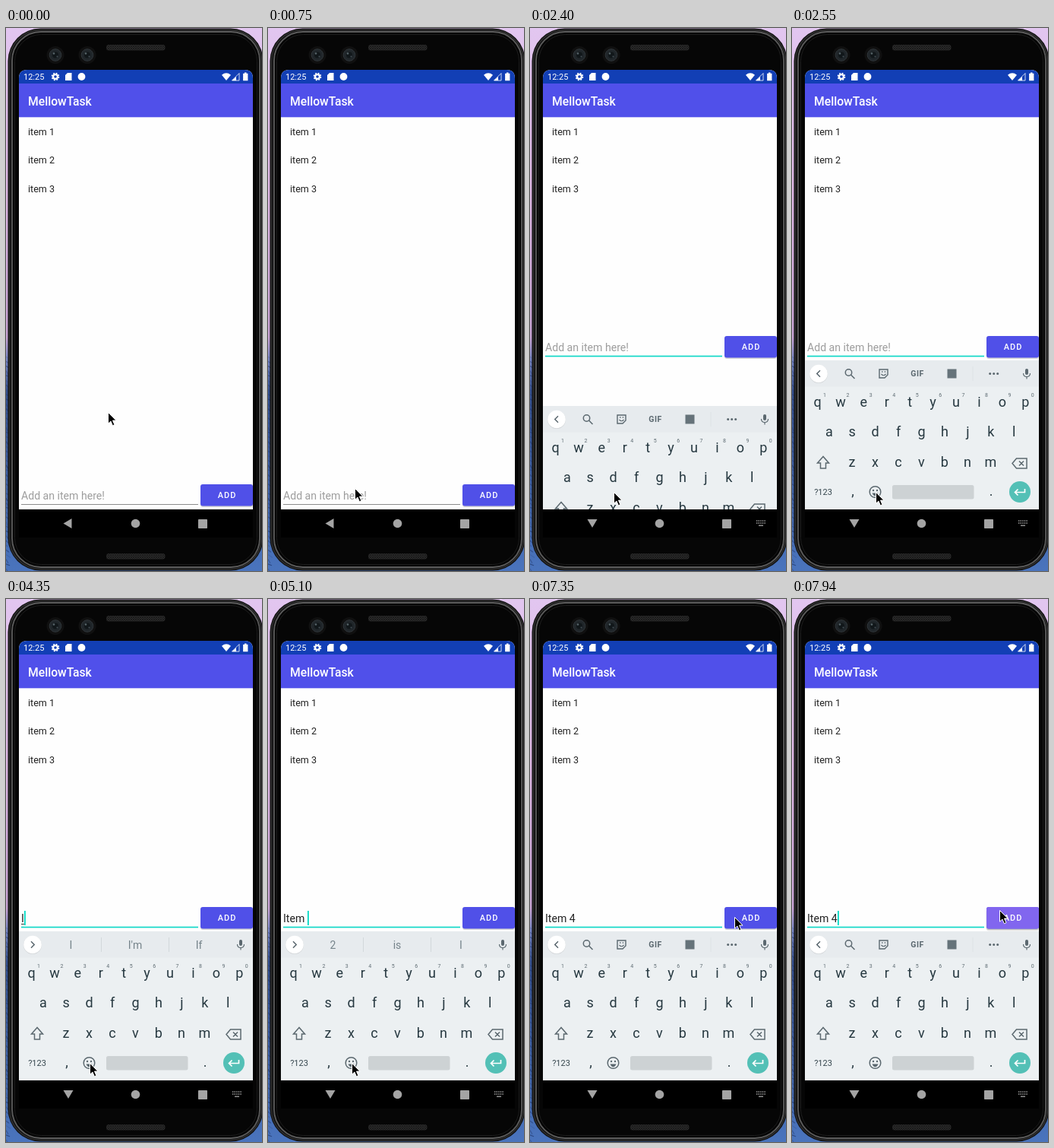
An HTML page that plays this animation: 337 by 714 pixels, repeating every 8 s.

```html
<!DOCTYPE html>
<html lang="en">
<head>
<meta charset="utf-8">
<title>List app demo</title>
<style>
  html, body { margin: 0; width: 100%; height: 100%; overflow: hidden; background: #000; }
  svg { display: block; width: 100vw; height: 100vh; }
  text { font-family: Roboto, "Noto Sans", sans-serif; white-space: pre; }
  .mid text, text.mid { text-anchor: middle; }
  .item { font-size: 12.55px; fill: #222; }
  .key { font-size: 18px; fill: #263840; }
  .hint { font-size: 7px; fill: #5f6c73; }
  .word { font-size: 14px; fill: #75838a; }
  .line { fill: none; stroke: #5b686f; stroke-width: 1.5; }
</style>
</head>
<body>
<svg viewBox="0 0 337 714" preserveAspectRatio="none">
  <defs>
    <linearGradient id="sky" x1="0" y1="0" x2="0" y2="1">
      <stop offset="0" stop-color="#e2c6f0"/>
      <stop offset=".3" stop-color="#dcb6e2"/>
      <stop offset=".57" stop-color="#c6a2d2"/>
      <stop offset=".61" stop-color="#7886c4"/>
      <stop offset=".67" stop-color="#34508f"/>
      <stop offset="1" stop-color="#4a74bd"/>
    </linearGradient>
    <pattern id="mesh" width="3" height="3" patternUnits="userSpaceOnUse">
      <rect width="3" height="3" fill="#2b2b2b"/>
      <path d="M0 0L3 3M3 0L0 3" stroke="#161616" stroke-width=".8"/>
    </pattern>
    <clipPath id="screen"><path d="M17 670V66Q17 55 28 55H314Q325 55 325 66V670Z"/></clipPath>
    <clipPath id="tray"><rect x="17" y="437" width="308" height="196"/></clipPath>
    <clipPath id="btn"><rect x="256" y="600" width="69" height="28.5" rx="3"/></clipPath>
  </defs>

  <rect width="337" height="714" fill="url(#sky)"/>
  <g id="rocks" stroke="#22396e" stroke-width="1.2"></g>

  <!-- phone body -->
  <rect x="2.5" y=".5" width="336" height="713" rx="43" fill="#111"/>
  <rect x="4.5" y="2.5" width="332" height="709" rx="41" fill="none" stroke="#303030" stroke-width="1.5"/>
  <rect x="8" y="5" width="326" height="704" rx="38" fill="#050505" stroke="#5c5c5c" stroke-width="1.8"/>
  <rect x="11.5" y="8.5" width="319" height="697" rx="35" fill="#060606" stroke="#1d1d1d"/>
  <rect x="132" y="22" width="77.500" height="7.500" rx="3" fill="url(#mesh)"/>
  <rect x="132" y="691" width="77.500" height="7.500" rx="3" fill="url(#mesh)"/>
  <g id="lenses"></g>

  <g clip-path="url(#screen)">
    <rect x="17" y="55" width="308" height="578" fill="#fefefe"/>
    <rect x="17" y="55" width="308" height="18.500" fill="#123fb5"/>
    <rect x="17" y="73" width="308" height="44.300" fill="#5050ea"/>
    <rect x="17" y="633" width="308" height="37" fill="#000"/>
    <g fill="#fff">
      <text x="23" y="68" font-size="11">12:25</text>
      <circle cx="65" cy="64" r="2.900" fill="none" stroke="#fff" stroke-width="2.200"/>
      <circle cx="65" cy="64" r="4.500" fill="none" stroke="#fff" stroke-width="1.600" stroke-dasharray="2 1.534"/>
      <path d="M81 59h5.500v10h-8.500v-7z"/>
      <circle cx="99.500" cy="64" r="4.900"/>
      <path d="M284 61.700Q290 57 296 61.700L290 69Z"/>
      <path d="M307 59.500V69H297.500Z" fill="none" stroke="#fff" stroke-width=".8"/>
      <path d="M303 64V69H297.500Z"/>
      <path d="M314 58.500h2.500v1.200h1.900v9.600h-6.300v-9.600h1.900z"/>
      <text x="29" y="101.700" font-size="15.700" font-weight="500">MellowTask</text>
    </g>
    <text class="item" x="29" y="140.800">item 1</text>
    <text class="item" x="29" y="178.400">item 2</text>
    <text class="item" x="29" y="216">item 3</text>

    <g id="form">
      <text id="field" x="20" y="620.200" font-size="14.100"></text>
      <rect id="compose" x="20" y="622" height="1" fill="#333"/>
      <rect id="rule" x="20" width="233"/>
      <rect id="caret" y="605" width="1.800" height="19" fill="#03dac5"/>
      <rect x="256" y="601.500" width="69" height="28.500" rx="3" fill="#000" opacity=".16"/>
      <rect id="lift" x="255.500" y="603" width="70" height="28.500" rx="4" fill="#000" opacity=".1"/>
      <rect x="256" y="600" width="69" height="28.500" rx="3" fill="#5050e8"/>
      <g clip-path="url(#btn)"><circle id="ripple" cx="278" cy="608" fill="#8166ef"/></g>
      <text class="mid" x="291" y="618.400" font-size="11" font-weight="500" letter-spacing=".98" fill="#fff">ADD</text>
    </g>

    <g clip-path="url(#tray)"><g id="keyboard">
      <rect x="17" y="437" width="308" height="196" fill="#ecf0f2"/>
      <rect x="17" y="437" width="308" height="34.500" fill="#e7ebee"/>
      <circle cx="35" cy="455" r="12" fill="#000" opacity=".1"/>
      <circle cx="35" cy="454.500" r="11.800" fill="#fff"/>
      <path id="chevron" class="line"/>
      <g class="line">
        <rect x="307" y="448" width="4" height="8" rx="2" fill="#5b686f" stroke="none"/>
        <path d="M304.500 454q0 4.500 4.500 4.500t4.500-4.500M309 458.500v3" stroke-width="1.200"/>
      </g>
      <g id="tools">
        <g class="line">
          <circle cx="74.500" cy="453" r="4.200"/><path d="M77.500 456L82.500 461"/>
          <path d="M115 449h11v7l-4 4h-7z" stroke-width="1.400"/>
          <path d="M117.500 455q3 3.500 6 0" stroke-width="1.200"/>
          <path d="M118 452h1.500M121.700 452h1.500" stroke-width="1.400"/>
          <path d="M238 445V464" stroke="#dde2e5" stroke-width="1"/>
        </g>
        <text class="mid" x="165" y="458.200" font-size="10.500" font-weight="700" letter-spacing=".5" fill="#5b686f">GIF</text>
        <rect x="204.500" y="448.500" width="12" height="12" fill="#66737a"/>
        <g fill="#5b686f"><circle cx="260.700" cy="454.500" r="1.500"/><circle cx="265.700" cy="454.500" r="1.500"/><circle cx="270.700" cy="454.500" r="1.500"/></g>
      </g>
      <g id="words" class="mid">
        <path d="M125.500 445V464M214.500 445V464" stroke="#d2d8db"/>
        <text class="word" x="85.500" y="459.500"></text>
        <text class="word" x="170" y="459.500"></text>
        <text class="word" x="254" y="459.500"></text>
      </g>
      <g id="keys" class="mid"></g>
      <path class="line" d="M41 563.500L33.500 572H37.500V579H44.500V572H48.500Z"/>
      <path class="line" d="M290 572.500L295.500 566H309V579H295.500ZM299 569.500L305 575.500M305 569.500L299 575.500"/>
      <text class="mid" x="41" y="614" font-size="11" fill="#37474f">?123</text>
      <text class="mid key" x="80" y="615" font-size="16">,</text>
      <text class="mid key" x="262" y="615" font-size="16">.</text>
      <circle class="line" cx="109.500" cy="610" r="7.300"/>
      <g fill="#5b686f"><circle cx="107" cy="608" r="1.200"/><circle cx="112" cy="608" r="1.200"/><path d="M105.500 611.500h8q-1.300 3.700-4 3.700t-4-3.700z"/></g>
      <rect x="132" y="601" width="107.500" height="18.500" rx="2.500" fill="#cdd2d4"/>
      <circle cx="300" cy="610" r="14" fill="#53c0b6"/>
      <path d="M306.500 606V610.500H294M297.500 606.500L293.500 610.500L297.500 614.500" fill="none" stroke="#fff" stroke-width="1.700"/>
    </g></g>

    <g fill="#a4a4a4">
      <path id="back"/>
      <circle cx="170.500" cy="651.500" r="5.800"/>
      <rect x="253" y="646" width="12" height="12" rx=".8"/>
      <g id="switch" stroke="#a4a4a4" stroke-width="1.300">
        <path d="M298 648H310M298 651H310" stroke-dasharray="1.400 1.200"/>
        <path d="M301 654.200H307"/>
      </g>
    </g>
  </g>

  <path id="pointer" d="M.5 .5V15.200L3.900 12L6.400 17.800L8.900 16.700L6.500 11.100H11Z" fill="#000" stroke="#fff" stroke-width="1"/>
</svg>
<script>
const LOOP = 8000;
const $ = id => document.getElementById(id);
const set = (id, attrs) => { for (const k in attrs) $(id).setAttribute(k, attrs[k]); };
const show = (id, on) => set(id, { visibility: on ? 'visible' : 'hidden' });

// typed text, composing flag and suggestions, each from its start time
const typing = [
  [0, '', false, null],
  [4350, 'I', true, ['I', "I'm", 'If']],
  [4500, 'It', true, ['It', "It's", 'Its']],
  [4650, 'Ite', true, ['Item', 'Ite', 'Items']],
  [4800, 'Item', true, ['Item', 'Items', 'Iten']],
  [5100, 'Item ', false, ['2', 'is', 'I']],
  [5850, 'Item 4', false, ['', '', '']],
  [6000, 'Item 4', false, null]
];

// times at which the caret flips, starting hidden
const blinks = [1650, 2400, 3000, 3450, 3900, 5550, 5850, 6450, 6900, 7350, 7790];

const path = [
  [0, 134, 505], [150, 131, 512], [300, 127, 536], [450, 121, 569], [600, 116, 594],
  [750, 114, 605], [1350, 114, 605], [1500, 112, 608], [1650, 110, 610], [6300, 110, 610],
  [6450, 126, 597], [6750, 174, 543], [7050, 237, 465], [7350, 269, 418], [7490, 273, 410],
  [7640, 273, 409]
];

function pointerAt(t) {
  const i = path.findIndex(p => p[0] > t);
  if (i < 0) return path[path.length - 1].slice(1);
  const [t0, x0, y0] = path[i - 1], [t1, x1, y1] = path[i];
  const k = (t - t0) / (t1 - t0);
  return [x0 + (x1 - x0) * k, y0 + (y1 - y0) * k];
}

function build() {
  const step = 30.42;
  let keys = '';
  [['qwertyuiop', 33.5, 498], ['asdfghjkl', 48.8, 537], ['zxcvbnm', 79, 577]].forEach(([row, x, y], r) => {
    [...row].forEach((c, i) => {
      keys += `<text class="key" x="${x + i * step}" y="${y}">${c}</text>`;
      if (!r) keys += `<text class="hint" x="${43 + i * step}" y="485">${(i + 1) % 10}</text>`;
    });
  });
  $('keys').innerHTML = keys;

  $('lenses').innerHTML = [65, 107].map(x =>
    `<circle cx="${x}" cy="35.5" r="11.5" fill="#101010"/>
     <circle cx="${x}" cy="35.5" r="7.8" fill="#20262a" stroke="#30363a"/>
     <circle cx="${x}" cy="35.5" r="4" fill="#11171a"/>
     <circle cx="${x - 2}" cy="33.5" r="1.3" fill="#59666b"/>
     <circle cx="${x + 2.5}" cy="37.5" r="1" fill="#475257"/>`).join('');

  let rocks = '';
  for (let i = 0; i < 46; i++) {
    const y = 432 + i * 6.2;
    rocks += `<path d="M0 ${y}L${2 + i * 7 % 5} ${y + 2 + i * 5 % 4}" opacity="${.2 + i * 3 % 7 / 12}"/>`;
  }
  $('rocks').innerHTML = rocks;
}

function draw(time) {
  const t = time < 7490 ? Math.floor(time / 150) * 150 : 7490 + Math.floor((time - 7490) / 150) * 150;
  const [, text, composing, words] = typing.filter(s => s[0] <= t).pop();
  const focused = t >= 1650, open = t >= 2400;

  set('form', { transform: `translate(0 ${open ? -195 : 0})` });
  $('field').textContent = text || 'Add an item here!';
  set('field', { fill: text ? '#222' : '#9d9d9d' });
  const width = text ? $('field').getComputedTextLength() : 0;
  set('compose', { width: composing ? width : 0 });
  set('caret', { x: Math.round(20 + width) });
  show('caret', blinks.filter(b => b <= t).length % 2);
  const thick = t >= 2100;
  set('rule', { y: thick ? 625.7 : 626, height: thick ? 1.7 : 1, fill: focused ? '#12d8c8' : '#8c8c8c' });

  set('ripple', { r: t < 7640 ? 0 : t < 7790 ? 18 : t < 7940 ? 42 : 80 });
  show('lift', t >= 7790);

  show('keyboard', open);
  set('keyboard', { transform: `translate(0 ${t < 2550 ? 60 : 0})` });
  const suggest = open && words;
  $('tools').style.display = suggest ? 'none' : '';
  $('words').style.display = suggest ? '' : 'none';
  if (words) $('words').querySelectorAll('text').forEach((el, i) => { el.textContent = words[i]; });
  set('chevron', { d: suggest ? 'M33 450.3L37.2 454.5L33 458.7' : 'M37 450.3L32.8 454.5L37 458.7' });

  set('back', { d: open ? 'M75.5 646H88.5L82 657Z' : 'M86.500 645V658L75.500 651.500Z' });
  show('switch', t >= 2100);
  set('pointer', { transform: `translate(${pointerAt(t).join(' ')})` });
}

build();
const start = performance.now();
function tick() {
  draw((performance.now() - start) % LOOP);
  requestAnimationFrame(tick);
}
tick();
</script>
</body>
</html>
```
